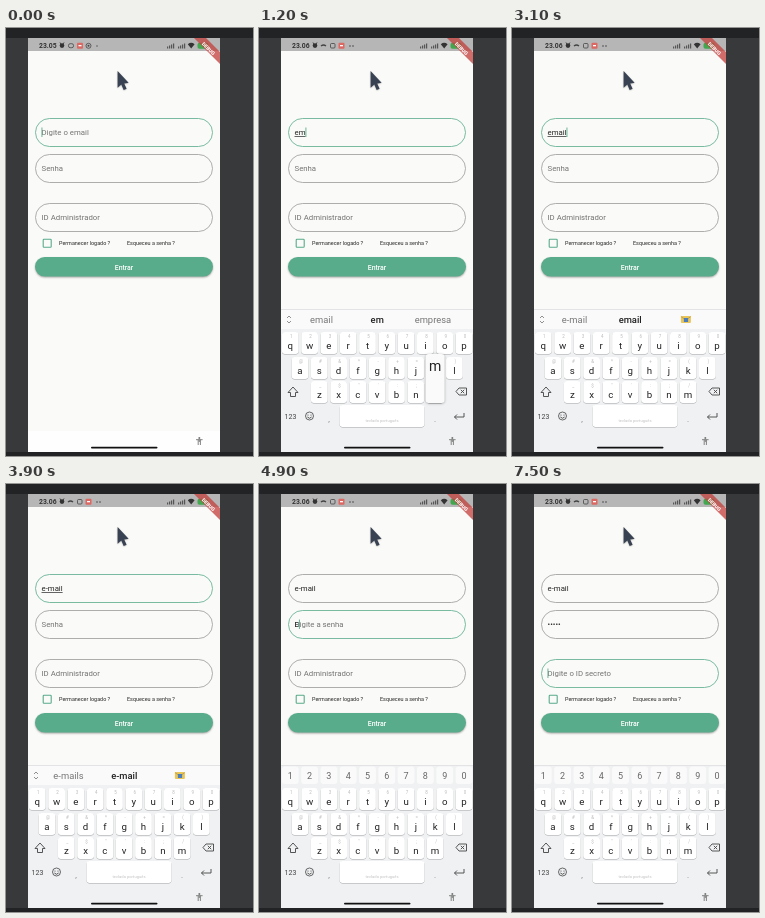
An HTML page with a canvas that plays this animation: 247 by 428 pixels, repeating every 8 s.

```html
<!DOCTYPE html>
<html lang="pt">
<head>
<meta charset="utf-8">
<title>Login</title>
<style>
  html, body { margin: 0; width: 100%; height: 100%; overflow: hidden; background: #37393b; }
  canvas { display: block; width: 100%; height: 100%; }
</style>
</head>
<body>
<canvas id="stage"></canvas>
<script>
const W = 247, H = 428, LOOP = 8000;
const GREEN = '#58ab8b', HINT = '#747474', INK = '#252525';
const canvas = document.getElementById('stage');
const ctx = canvas.getContext('2d');

// Each step overrides part of the state that came before it.
const steps = [
  [0, { clock: '23.05', keyboard: false, icons: 0, focus: 0, caret: true,
        email: '', password: '', hint: true, pops: '', words: ['E', 'I', 'Mas'] }],
  [500, { keyboard: true, icons: 1, caret: false }],
  [700, { clock: '23.06' }],
  [1100, { email: 'e', caret: true, pops: 'e', words: ['é', 'e', 'eu'] }],
  [1200, { email: 'em', pops: 'm', words: ['email', 'em', 'empresa'] }],
  [1500, { pops: '' }],
  [1600, { email: 'ema', pops: 'a' }],
  [1700, { pops: 'ai' }],
  [2000, { email: 'email', pops: '', words: ['e-mail', 'email', 'mail-icon'] }],
  [2400, { caret: false }],
  [3100, { caret: true }],
  [3500, { email: 'e-mail', words: ['e-mails', 'e-mail', 'mail-icon'] }],
  [3900, { caret: false }],
  [4300, { focus: 1, caret: true }],
  [4500, { words: null }],
  [4900, { password: 'E' }],
  [5100, { password: '•s', hint: false }],
  [5300, { password: '•••' }],
  [5500, { password: '•••••' }],
  [6100, { caret: false }],
  [6500, { caret: true }],
  [7100, { caret: false }],
  [7500, { focus: 2, caret: true }]
];

const stateAt = time =>
  Object.assign({}, ...steps.filter(([start]) => start <= time).map(([, change]) => change));

function text(str, x, y, size, color = INK, align = 'left', weight = 400) {
  ctx.font = `${weight} ${size}px Roboto, sans-serif`;
  ctx.textAlign = align;
  ctx.fillStyle = color;
  ctx.fillText(str, x, y);
  return ctx.measureText(str).width;
}

function rect(x, y, w, h, color) {
  ctx.fillStyle = color;
  ctx.fillRect(x, y, w, h);
}

function box(x, y, w, h, r, fill, stroke, width = 0.8) {
  ctx.beginPath();
  ctx.roundRect(x, y, w, h, r);
  if (fill) { ctx.fillStyle = fill; ctx.fill(); }
  if (stroke) { ctx.strokeStyle = stroke; ctx.lineWidth = width; ctx.stroke(); }
}

function path(d, { fill, stroke, width = 0.9 }) {
  const shape = new Path2D(d);
  if (fill) { ctx.fillStyle = fill; ctx.fill(shape); }
  if (stroke) { ctx.strokeStyle = stroke; ctx.lineWidth = width; ctx.stroke(shape); }
}

function disc(x, y, r, fill, stroke) {
  box(x - r, y - r, 2 * r, 2 * r, r, fill, stroke);
}

function shadowed(blur, offset, draw) {
  ctx.save();
  ctx.shadowColor = '#0005';
  ctx.shadowBlur = blur * scale;
  ctx.shadowOffsetY = offset * scale;
  draw();
  ctx.restore();
}

function statusBar(s) {
  rect(22, 10, 192, 13, '#b5b6b5');
  text(s.clock, 33, 20.2, 6.8, '#333', 'left', 700);
  disc(56, 17.6, 2.3, '#333');
  path('M54 14.5 L55 16 M58 14.5 L57 16', { stroke: '#333' });
  if (s.icons) {
    path('M62 18 Q64.5 16 67 18', { stroke: '#444', width: 1.4 });
    box(71.5, 15.5, 4.5, 4.5, 1, null, '#444');
    box(79.5, 14.8, 6, 6, 1, '#dc6863');
    rect(81, 17, 3, 1.3, '#fff');
    disc(91, 18, 0.8, '#444');
    disc(94, 18, 0.8, '#444');
  } else {
    box(62.5, 15.7, 5, 4, 1.7, null, '#444');
    box(71, 14.8, 6, 6, 1, '#dc6863');
    rect(72.5, 17, 3, 1.3, '#fff');
    disc(82.5, 17.8, 2.5, null, '#444');
    disc(82.5, 17.8, 1, '#444');
    disc(91, 18, 0.7, '#444');
  }
  for (const x of [161, 172])
    for (let i = 0; i < 4; i++) rect(x + i * 2, 18.5 - i, 1.2, 2 + i, '#555');
  path('M181.8 16.2 Q185.2 13.4 188.6 16.2 L185.2 20.5 Z', { fill: '#333' });
  box(191.5, 14.7, 11, 6, 2, '#42a850');
}

function debugBanner() {
  path('M188 10 H200 L214 24 V36 Z', { fill: 'rgba(195,65,62,.76)' });
  ctx.save();
  ctx.translate(203.5, 19.5);
  ctx.rotate(Math.PI / 4);
  text('DEBUG', 0, 3.3, 5, '#fff', 'center', 900);
  ctx.restore();
}

function field(y, value, hint, s, focused, underline) {
  box(29.5, y + 0.5, 177, 28, 14, null, focused ? GREEN : '#9a9a9a');
  const x = 35.5, base = y + 17;
  if (hint) text(hint, x, base, 7.8, HINT);
  const width = value ? text(value, x, base, 7.8) : 0;
  if (underline) rect(x, base + 1.3, width, 0.7, INK);
  if (focused && s.caret) rect(x + width, y + 9.5, 0.9, 9.5, GREEN);
}

function form(s) {
  const typing = s.focus === 0;
  field(90, s.email, s.email ? '' : 'Digite o email', s, typing, typing && s.email);
  const passwordHint = s.focus === 1 ? 'Digite a senha' : 'Senha';
  field(126, s.password, s.hint ? passwordHint : '', s, s.focus === 1);
  field(175, '', s.focus === 2 ? 'Digite o ID secreto' : 'ID Administrador', s, s.focus === 2);
  box(37.2, 211.2, 8, 8, 0.8, null, GREEN, 1.1);
  text('Permanecer logado ?', 53, 217.2, 5.45);
  text('Esqueceu a senha ?', 121, 217.2, 5.45);
  shadowed(2, 1, () => box(29, 229, 178, 19.5, 9.75, GREEN));
  text('Entrar', 118, 241.5, 6.9, '#fff', 'center', 500);
}

const rows = [
  { keys: 'qwertyuiop', x: 31.3, y: 304, marks: '1234567890' },
  { keys: 'asdfghjkl', x: 41, y: 329, marks: '@#&*-+=()' },
  { keys: 'zxcvbnm', x: 60.3, y: 353, marks: '_$"\':;/' }
];
const PITCH = 19.3;

function key(x, y, label, mark) {
  shadowed(0.6, 0.6, () => box(x - 8.4, y, 16.8, 22, 3, '#fff'));
  text(mark, x + 1, y + 6, 4.5, '#bbb', 'center');
  text(label, x, y + 16.8, 9.7, '#222', 'center');
}

function popup(x, y, label) {
  shadowed(2.5, 0.5, () => box(x - 9.5, y - 27, 19, 49, 3, '#fafafa'));
  text(label, x, y - 10, 14, '#222', 'center');
}

function suggestions(words) {
  rect(22, 282, 192, 19, '#fafafa');
  path('M28 290 L30 288 L32 290 M28 293 L30 295 L32 293', { stroke: '#777', width: 0.8 });
  words.forEach((word, i) => {
    const x = 62.5 + i * 55.7;
    if (word !== 'mail-icon') {
      text(word, x, 295, 9.4, i === 1 ? '#222' : '#777', 'center', i === 1 ? 500 : 400);
      return;
    }
    box(x - 5, 288, 10, 7, 1, '#e9c65b');
    path(`M${x - 5} 288.5 L${x} 292 L${x + 5} 288.5`, { stroke: '#b99135', width: 0.7 });
    rect(x - 2, 290, 4.2, 4, '#4b7dbd');
  });
}

function digitRow() {
  [...'1234567890'].forEach((digit, i) => {
    const x = 31.3 + i * PITCH;
    box(x - 8.4, 282.5, 16.8, 17.5, 3, '#fafafa');
    text(digit, x, 294.6, 9, '#666', 'center');
  });
}

function keyboard(s) {
  rect(22, 281, 192, 143, '#eff1f2');
  rect(22, 281, 192, 0.7, '#dedfe0');
  if (s.words) suggestions(s.words); else digitRow();

  const pressed = [];
  for (const row of rows)
    [...row.keys].forEach((label, i) => {
      const x = row.x + i * PITCH;
      key(x, row.y, label, row.marks[i]);
      if (s.pops.includes(label)) pressed.push([x, row.y, label]);
    });

  const line = { stroke: '#444', width: 0.9 };
  path('M34 359 L39 364.5 H36.5 V368.5 H31.5 V364.5 H29 Z', line);
  path('M197 363.5 L200 360 H207.5 V367 H200 Z M201.8 361.8 L205.2 365.2 M205.2 361.8 L201.8 365.2', line);
  text('123', 31.5, 390.8, 7, '#444', 'center');
  disc(50.5, 388, 4, null, '#444');
  disc(49, 387, 0.6, '#444');
  disc(52, 387, 0.6, '#444');
  path('M48.4 389 Q50.5 391.5 52.6 389', line);
  text(',', 70, 394, 8, '#777', 'center');
  text('.', 176, 394, 8, '#777', 'center');
  shadowed(0.6, 0.6, () => box(80.5, 377, 85, 22, 3, '#fff'));
  text('teclado português', 123, 394, 4.1, '#c0c0c0', 'center');
  path('M205 385 V389 H195.5 M198 386.5 L195.5 389 L198 391.5', line);
  pressed.forEach(args => popup(...args));
}

function homeBar() {
  box(85, 418.7, 66.5, 1.8, 0.9, '#111');
  disc(193.3, 410, 1, '#777');
  path('M190 411.7 H196.6 M193.3 411.7 V414 M192.2 411.7 V417 M194.4 411.7 V417', { stroke: '#777', width: 0.9 });
}

function pointer() {
  shadowed(1.5, 0.5, () =>
    path('M111.6 43 V59.8 L115.3 56.6 L117.7 62 L120.6 60.7 L118.2 55.4 L122.6 54.8 Z', { fill: '#394252' }));
}

let scale = 1;

function draw(time) {
  const s = stateAt(time);
  const dpr = window.devicePixelRatio || 1;
  const width = Math.round(innerWidth * dpr), height = Math.round(innerHeight * dpr);
  if (canvas.width !== width || canvas.height !== height) {
    canvas.width = width;
    canvas.height = height;
  }
  scale = width / W;
  ctx.setTransform(scale, 0, 0, height / H, 0, 0);
  rect(0, 0, W, H, '#37393b');
  rect(0, 0, W, 10, '#222325');
  rect(0, 424, W, 4, '#222325');
  rect(22, 10, 192, 414, '#fafaf8');
  statusBar(s);
  debugBanner();
  form(s);
  if (s.keyboard) keyboard(s);
  else rect(22, 403, 192, 21, '#fefefe');
  homeBar();
  pointer();
}

const begin = performance.now();
function tick() {
  draw((performance.now() - begin) % LOOP);
  requestAnimationFrame(tick);
}
tick();
</script>
</body>
</html>
```
